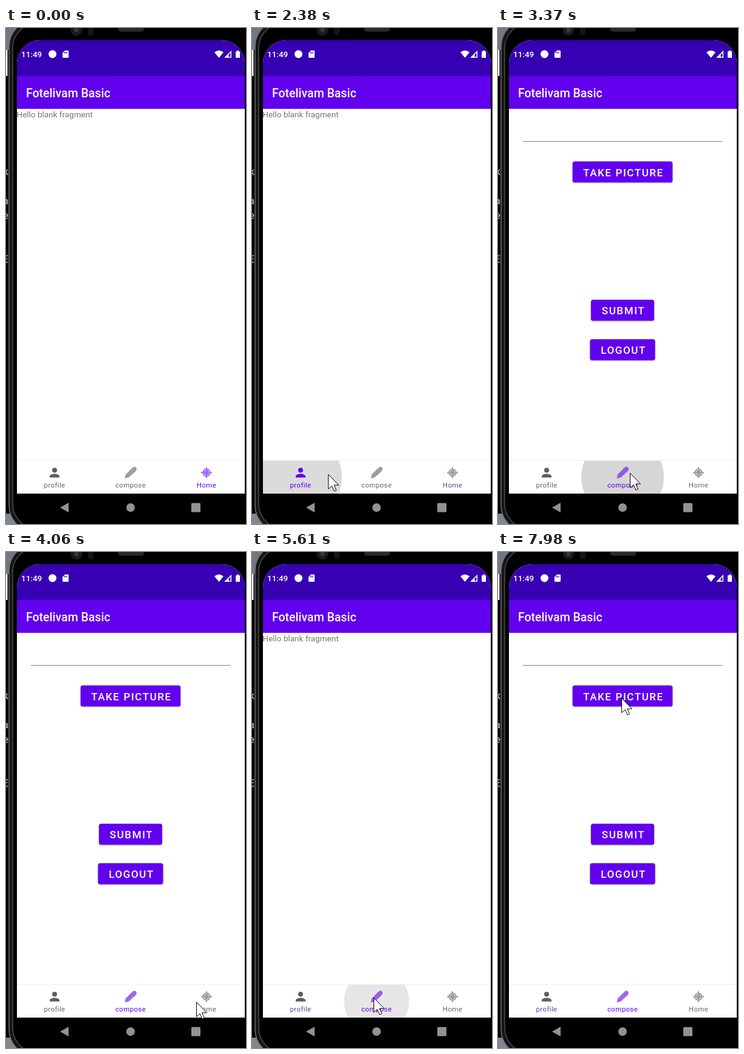
Animation, 395 px wide and 816 px high, one loop 8000 ms. Source, as an HTML page:

```html
<!DOCTYPE html>
<html lang="en">
<head>
<meta charset="utf-8">
<title>Bottom navigation demo</title>
<style>
  html, body { margin: 0; width: 100%; height: 100%; overflow: hidden; background: #000; }
  svg { display: block; font-family: Roboto, sans-serif; }
  text.label { font-size: 11.5px; letter-spacing: .35px; text-anchor: middle; }
  .button text { font-size: 17px; font-weight: 500; letter-spacing: 1.6px; text-anchor: middle; fill: #fff; }
  .button rect { fill: #6200ee; filter: drop-shadow(0 1px 1px #0006); }
</style>
</head>
<body>
<svg width="395" height="816" viewBox="0 0 395 816">
  <defs>
    <clipPath id="screen"><rect x="18" y="20" width="375" height="792" rx="38"/></clipPath>
    <clipPath id="bar"><rect x="18" y="712" width="375" height="54"/></clipPath>
  </defs>

  <!-- Window behind the phone -->
  <rect width="24" height="36" fill="#6f7984"/>
  <rect y="36" width="2.5" height="43" fill="#fff"/>
  <rect y="799" width="24" height="17" fill="#7c8990"/>
  <g fill="#ccc" font-size="17" text-anchor="end">
    <text x="4" y="242">k</text><text x="4" y="290">a</text>
    <text x="4" y="314">e</text><text x="4" y="386">E</text>
  </g>

  <!-- Phone body -->
  <rect x="5" y="-14" width="420" height="844" rx="45" fill="#161617" stroke="#707074" stroke-width="1.5"/>
  <rect x="11" y="-8" width="409" height="832" rx="41" stroke="#4c4c4e" stroke-width="1.5"/>
  <circle cx="116" cy="3" r="9.5" fill="#1b1b1d"/>
  <circle cx="116" cy="3" r="4" fill="#34363b"/>
  <rect x="135" y="-2" width="9" height="14" rx="4" fill="#141416"/>
  <rect x="185" y="-4" width="42" height="10" rx="4" fill="#29292b"/>

  <g clip-path="url(#screen)">
    <rect x="18" y="20" width="375" height="746" fill="#fff"/>
    <rect x="18" y="20" width="375" height="59" fill="#3700b3"/>
    <rect x="18" y="79" width="375" height="54" fill="#6200ee"/>
  </g>
  <g fill="#fff" font-weight="500">
    <text x="25" y="48" font-size="13.5">11:49</text>
    <text x="33" y="113.5" font-size="19.5">Fotelivam Basic</text>
    <circle cx="76.5" cy="43" r="6.5"/>
    <path d="M97 37h5q1 0 1 1v10q0 1-1 1h-8q-1 0-1-1v-7z"/>
    <path d="M343 40q7.5-6 15 0l-7.5 9z"/>
    <path d="M371 37v12h-12zm-1.500 4v6.500h-3v-4z" fill-rule="evenodd"/>
    <path d="M380 37h3v1.500h2v10.500h-7v-10.500h2z"/>
  </g>
  <path d="M96 39v3m2-3v3m2-3v3" stroke="#3700b3"/>
  <g fill="#929292">
    <path d="M89 789l14-8v16z"/>
    <circle cx="205" cy="789" r="7"/>
    <rect x="305" y="781.5" width="15" height="15" rx="1.5"/>
  </g>

  <text id="hello" x="17.5" y="147" font-size="13.5" fill="#757575">Hello blank fragment</text>
  <g id="compose"><path d="M41 186.5h328.5" stroke="#858585"/></g>

  <path d="M18 711.5h375" stroke="#eee"/>
  <circle id="ripple" cy="739" clip-path="url(#bar)"/>
  <g transform="translate(80 731.5)">
    <path class="icon" d="M0 0a4 4 0 1 0 0-8 4 4 0 0 0 0 8zm0 2c-2.7 0-8 1.3-8 4v2h16v-2c0-2.7-5.3-4-8-4z"/>
    <text class="label" y="24.5">profile</text>
  </g>
  <g transform="translate(205 731.5)">
    <path class="icon" opacity=".6" d="M-9.500 9.500l1.500-6.500 11-11q3-3 6-.5 2 3-.5 6l-11.500 10.500z"/>
    <text class="label" y="24.5">compose</text>
  </g>
  <g transform="translate(330 731.5)">
    <g class="icon" opacity=".6">
      <path d="M-1-9h2v4h-2zm0 14h2v4h-2zM-9-1h4v2h-4zM5-1h4v2h-4z"/>
      <circle r="6.7"/>
      <circle r="4.4" fill="none" stroke="#fff" stroke-width=".9" stroke-dasharray="4.9 2" stroke-dashoffset="-1"/>
    </g>
    <text class="label" y="24.5">Home</text>
  </g>

  <path id="cursor" d="M.5.5v24l5.500-5 4 8.500 3.500-1.500-3.700-8.500h7.700z" fill="#fff" stroke="#000"/>
</svg>
<script>
const LOOP = 8000;
const $ = id => document.getElementById(id);
const icons = document.querySelectorAll('.icon');
const labels = document.querySelectorAll('.label');
const clamp = v => Math.max(0, Math.min(1, v));
const show = (id, visible) => $(id).style.display = visible ? '' : 'none';

const button = (text, top, width) => `<g class="button" transform="translate(205 ${top})">
  <rect x="${-width / 2}" width="${width}" height="34.5" rx="3.5"/><text x="1.5" y="24">${text}</text></g>`;
$('compose').innerHTML += button('TAKE PICTURE', 219.5, 164.5) + button('SUBMIT', 447, 104) + button('LOGOUT', 512, 107);

const taps = [
  { at: -LOOP, tab: 2, opens: -LOOP },
  { at: 2310, tab: 0, opens: 2400 },
  { at: 3150, tab: 1, opens: 3240 },
  { at: 4380, tab: 2, opens: 4470 },
  { at: 5570, tab: 1, opens: 6080 }
];

// Pointer moves: start, end, x, y; it rests in between
const moves = [
  [600, 1230, 187, 748], [1230, 1580, 92, 737], [1900, 2050, 74, 719],
  [2300, 2380, 125, 734], [2380, 2730, 198, 714], [2940, 3160, 217, 732],
  [3600, 4060, 313, 740], [5000, 5500, 200, 733], [5800, 6270, 149, 728],
  [6500, 6810, 172, 734], [7200, 7600, 314, 490], [7600, 7970, 203, 240]
];

function pointerAt(t) {
  return moves.reduce(([px, py], [start, end, x, y]) => {
    const k = clamp((t - start) / (end - start));
    return [px + (x - px) * k, py + (y - py) * k];
  }, [285, 800]);
}

function draw(t) {
  const { at, tab } = taps.findLast(tap => tap.at <= t);
  const page = taps.findLast(tap => tap.opens <= t).tab;
  const age = t - at + 30;

  show('compose', page === 1);
  show('hello', page !== 1);

  $('ripple').setAttribute('cx', 80 + 125 * tab);
  $('ripple').setAttribute('r', 68 * clamp(age / 90));
  $('ripple').setAttribute('opacity', .16 * clamp(age / 115) * clamp((460 - age) / 120));

  icons.forEach((icon, i) => icon.setAttribute('fill', i === tab ? '#6200ee' : '#5d5d62'));
  labels.forEach((label, i) => {
    const tinted = (i === 0 && t >= 4380) || (i === 2 && tab === 0);
    label.setAttribute('fill', i === tab ? '#6200ee' : tinted ? '#61469a' : '#66666a');
  });

  show('cursor', t >= 600);
  $('cursor').setAttribute('transform', `translate(${pointerAt(t)})`);
}

const origin = performance.now();
function tick() {
  draw((performance.now() - origin) % LOOP);
  requestAnimationFrame(tick);
}
tick();
</script>
</body>
</html>
```
